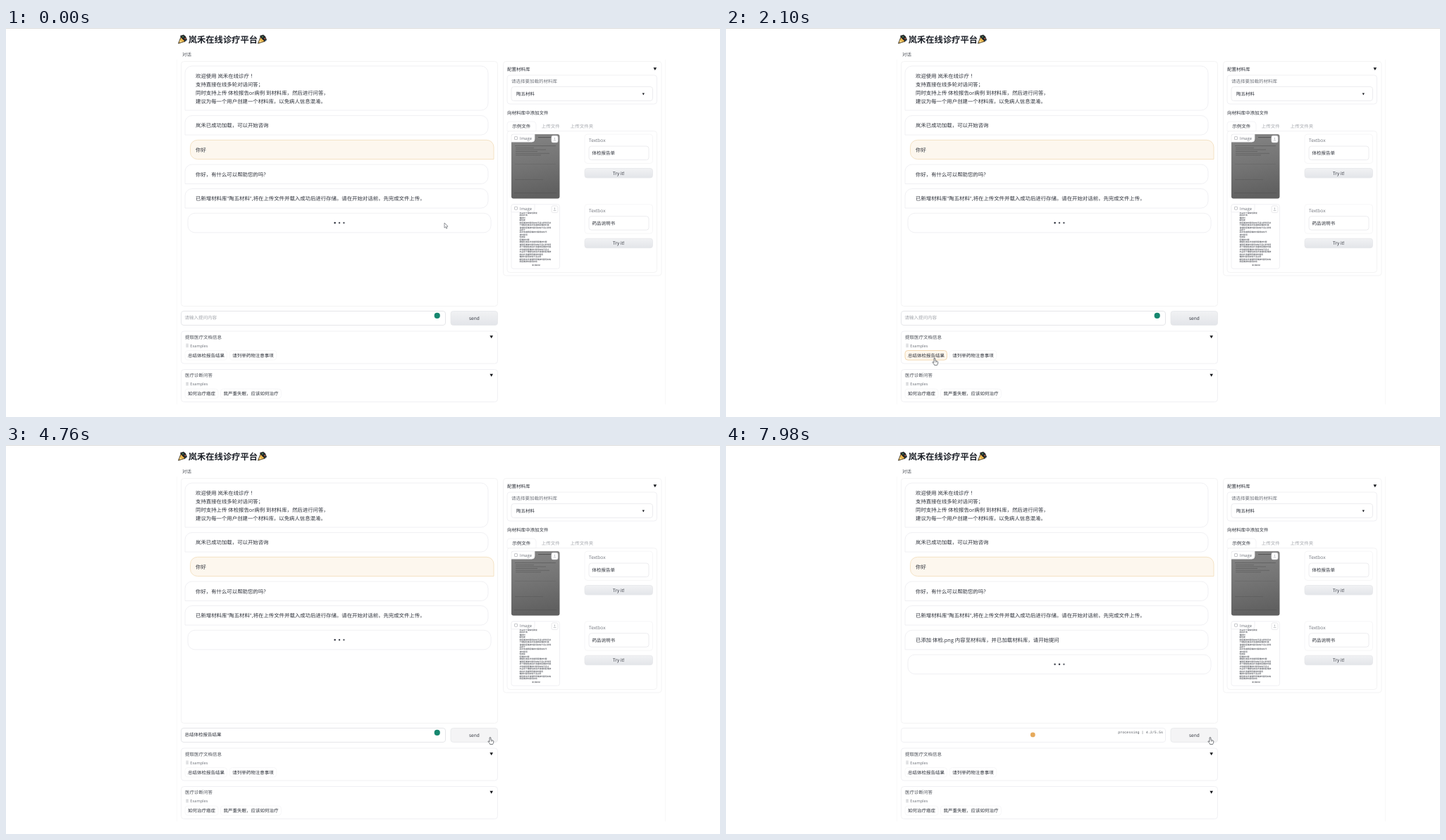
These frames come from a looping animation (1013x553 px, 8 s). An HTML page with a canvas:

```html
<!DOCTYPE html>
<html lang="zh">
<head>
<meta charset="utf-8">
<style>
html, body { margin: 0; width: 100%; height: 100%; overflow: hidden; background: #fff; }
canvas { display: block; }
</style>
</head>
<body>
<canvas id="stage" width="1013" height="553"></canvas>
<script>
const ctx = document.getElementById('stage').getContext('2d');
ctx.textRendering = 'geometricPrecision';

const LOOP = 8000, SENT = 5740;
const SANS = '"Open Sans", "Noto Sans CJK SC", "Noto Sans CJK", sans-serif';
const MONO = '"Liberation Mono", monospace';
const INK = '#2b2f38', GRAY = '#6f737b', PALE = '#a3a6ac', LINE = '#ededf0';
const CHIP = [254, 458.5, 59.5, 13.5], SEND = [631, 402.5, 66.5, 20];

// Text centred vertically on y
function text(str, x, y, { size = 6.5, color = INK, align = 'left', weight = 400, family = SANS } = {}) {
  ctx.font = `${weight} ${size}px ${family}`;
  ctx.fillStyle = color;
  ctx.textAlign = align;
  ctx.fillText(str, x, y + size * 0.37);
}

function box(x, y, w, h, radius = 4, stroke = LINE, fill) {
  ctx.beginPath();
  ctx.roundRect(x, y, w, h, radius);
  if (fill) { ctx.fillStyle = fill; ctx.fill(); }
  if (stroke) { ctx.strokeStyle = stroke; ctx.lineWidth = 0.8; ctx.stroke(); }
}

function shape(points, fill, stroke, width = 0.8) {
  ctx.beginPath();
  points.forEach(([x, y]) => ctx.lineTo(x, y));
  ctx.closePath();
  if (fill) { ctx.fillStyle = fill; ctx.fill(); }
  if (stroke) { ctx.strokeStyle = stroke; ctx.lineWidth = width; ctx.stroke(); }
}

function circle(x, y, r, fill) {
  ctx.beginPath();
  ctx.arc(x, y, r, 0, Math.PI * 2);
  ctx.fillStyle = fill;
  ctx.fill();
}

function rect(x, y, w, h, fill) {
  ctx.fillStyle = fill;
  ctx.fillRect(x, y, w, h);
}

function gradient(x0, y0, x1, y1, ...colors) {
  const g = ctx.createLinearGradient(x0, y0, x1, y1);
  colors.forEach((c, i) => g.addColorStop(i / (colors.length - 1), c));
  return g;
}

const arrowDown = (x, y, s = 2.3) => shape([[x - s, y - s * 0.8], [x + s, y - s * 0.8], [x, y + s]], '#15171c');
const inside = ([px, py], [x, y, w, h]) => px >= x && px <= x + w && py >= y && py <= y + h;

function button(label, x, y, w, h, hovered) {
  box(x, y, w, h, 3.5, '#e6e7ea', hovered ? '#f4f4f5' : gradient(0, y, 0, y + h, '#f1f2f4', '#e3e5e9'));
  text(label, x + w / 2, y + h / 2, { align: 'center' });
}

function popper(x) {
  ctx.save();
  ctx.translate(x, 9);
  shape([[3, 2], [8, 0.5], [11, 3], [13, 8], [9, 11], [5, 7]], '#25282a');
  shape([[0.5, 13], [4, 4], [10, 10]], '#e9b44c', '#25231c');
  shape([[2, 11], [3.2, 8], [6, 11.2]], '#f7d98a');
  circle(7, 3.5, 0.9, '#4d9a63');
  circle(10.3, 6, 0.9, '#cf6a4f');
  circle(11.6, 9, 0.7, '#4f86b8');
  ctx.restore();
}

function bubble(y, h, lines) {
  box(254, y, 430, h, [10, 10, 10, 0]);
  lines.forEach((s, i) => text(s, 269, y + 13.8 + i * 12, { size: 7.4 }));
}

function pending(y, t) {
  box(258, y, 430, 27.5, 10);
  for (let i = 0; i < 3; i++) {
    const phase = (((t / 525 - i * 0.33) % 1) + 1) % 1;
    ctx.globalAlpha = 0.62 + 0.36 * Math.abs(phase * 2 - 1);
    circle(466.6 + i * 6.4, y + 13.8, 1.25, '#1f2430');
  }
  ctx.globalAlpha = 1;
}

function chat(t) {
  const added = t >= 4870;
  box(248.5, 47.5, 449, 348, 4, '#f0f0f2');
  bubble(54, 63, ['欢迎使用 岚禾在线诊疗 ！', '支持直接在线多轮对话问答；',
    '同时支持上传 体检报告or病例 到材料库，然后进行问答，', '建议为每一个用户创建一个材料库，以免病人信息混淆。']);
  bubble(124.5, 27.5, ['岚禾已成功加载，可以开始咨询']);
  box(261.5, 159.3, 430.5, 27.2, [10, 10, 0, 10], '#f2dcb8', '#fdf7ee');
  text('你好', 269, 173, { size: 7.4 });
  bubble(194, 27.5, ['你好，有什么可以帮助您的吗？']);
  bubble(228.5, 27.5, ['已新增材料库"陶五材料",将在上传文件并载入成功后进行存储。请在开始对话前，先完成文件上传。']);
  if (added) bubble(263.3, 27.5, ['已添加 体检.png 内容至材料库，并已加载材料库，请开始提问']);
  else pending(263.3, t);
  if (t >= SENT) pending(298, t);
}

function promptRow(t, hoverPoint) {
  box(248.5, 402.5, 375, 20, 3.5, t < SENT ? '#dfe0e4' : LINE);
  if (t < SENT) {
    const filled = t >= 2200;
    text(filled ? '总结体检报告结果' : '请输入提问内容', 253.5, 412, { color: filled ? INK : PALE });
    circle(611.7, 408.9, 4.1, '#16876f');
  } else {
    const status = t < 7000 ? 'queue: 1/1' : 'processing';
    const seconds = Math.max(0, (t - 5775) * 0.001905).toFixed(1);
    circle(435.3, 411.9, 3.4, '#e6aa5c');
    text(`${status} | ${seconds}/5.5s`, 620, 408.5, { size: 5.07, align: 'right', color: '#555960', family: MONO });
  }
  button('send', ...SEND, inside(hoverPoint, SEND));
}

function examples(y, title, chips) {
  box(248.5, y, 449, 46, 4);
  text(title, 254, y + 8.3, { color: '#4c5058' });
  arrowDown(688.7, y + 8);
  for (let i = 0; i < 3; i++) rect(255.3, y + 18.4 + i * 1.7, 3.6, 0.6, PALE);
  text('Examples', 261.3, y + 20.5, { size: 5.6, color: GRAY });
  chips.forEach(([label, x, w, hovered]) => {
    box(x, y + 27.5, w, 13.5, 4, hovered ? '#efcf9f' : '#f5f5f6', hovered ? '#fff8ee' : null);
    text(label, x + 4, y + 34.3);
  });
}

function photo(x, y) {
  box(x, y, 68.5, 91.5, 3, null, gradient(x, y, x + 20, y + 91, '#858585', '#757575', '#606060'));
  rect(x + 38, y + 4, 22, 1, '#555');
  rect(x + 5, y + 16, 58, 0.7, '#5a5a5a');
  for (let i = 0; i < 5; i++) rect(x + 6, y + 19 + i * 2.6, 26 + (i * 17) % 29, 0.8, '#5f5f5f');
  rect(x + 5, y + 42, 58, 0.6, '#666');
  rect(x + 5, y + 64, 40, 0.6, '#5a5a5a');
  rect(x + 4, y + 83, 60, 0.7, '#555');
}

function leaflet(x, y) {
  const words = '本品用于缓解轻度症状请遵照医嘱按时服用如有不适立即停药并咨询医师';
  const lengths = [9, 4, 3, 3, 16, 15, 16, 3, 14, 4, 3, 5, 14, 16, 16, 15, 16, 12, 11, 16, 9];
  box(x, y, 68.5, 91.5, 3, LINE, '#fff');
  lengths.forEach((n, i) => {
    const start = (i * 7) % 16;
    text(words.slice(start, start + n), x + 11.5, y + 12 + i * 3.47, { size: 2.8, weight: 500 });
  });
  text('请仔细阅读', x + 35, y + 86, { size: 2.4, align: 'center' });
}

function sample(y, label, picture) {
  picture(717, y);
  box(717, y, 33, 11, [3, 0, 4, 0], LINE, '#fff');
  box(721.5, y + 3.5, 4, 4, 0.5, '#b5b7bc');
  text('Image', 729, y + 5.7, { size: 5.9, color: GRAY });
  box(774, y + 2.2, 9, 9.5, 2, '#e5e5e8', '#fff');
  rect(778.2, y + 4.6, 0.7, 3, PALE);
  rect(776.7, y + 8.6, 3.7, 0.6, PALE);
  box(821, y, 96.5, 41.5, 4, '#f4f4f5');
  text('Textbox', 827, y + 9, { color: GRAY });
  box(827, y + 17, 85, 19.5, 3.5, '#e8e8eb');
  text(label, 831.5, y + 26.7);
  button('Try it!', 821, y + 48.5, 96.5, 13.5);
}

function library() {
  box(705.5, 47.5, 224.5, 304.5, 4, '#f0f0f2');
  text('配置材料库', 711, 58.3);
  arrowDown(920.8, 58);
  box(711, 67, 212.5, 41, 4);
  text('请选择要加载的材料库', 717, 76, { color: GRAY });
  box(717, 83.5, 200.5, 20, 3.5, '#e8e8eb');
  text('陶五材料', 724, 93.6);
  arrowDown(904.3, 93.9, 1.6);
  text('向材料库中添加文件', 711, 120.4);
  text('示例文件', 718.3, 139.6);
  text('上传文件', 759.7, 139.6, { color: PALE });
  text('上传文件夹', 800.7, 139.6, { color: PALE });
  box(711, 133, 41, 13.5, [4, 4, 0, 0], '#f2f2f4');
  box(711, 146.5, 212.5, 201, 4, '#f0f0f2');
  sample(151, '体检报告单', photo);
  sample(250.7, '药品说明书', leaflet);
}

// Pointer route: time, x, y
const ROUTE = [
  [70, 622, 277], [630, 308, 413], [850, 288, 466], [1150, 295, 468], [1330, 348, 469],
  [1580, 296, 469.3], [2570, 296, 469.3], [3220, 564, 325], [3380, 650, 345], [4200, 687, 415.5],
];

function pointerAt(t) {
  const next = ROUTE.findIndex(key => key[0] > t);
  if (next === 0) return ROUTE[0].slice(1);
  if (next < 0) return ROUTE[ROUTE.length - 1].slice(1);
  const [t0, x0, y0] = ROUTE[next - 1], [t1, x1, y1] = ROUTE[next];
  const u = (t - t0) / (t1 - t0), k = u * u * (3 - 2 * u);
  return [x0 + (x1 - x0) * k, y0 + (y1 - y0) * k];
}

function pointer([x, y]) {
  ctx.save();
  ctx.translate(x, y);
  ctx.lineJoin = 'round';
  if (inside([x, y], CHIP) || inside([x, y], SEND)) {
    shape([[-0.9, 0.4], [0, 0], [0.9, 0.5], [1, 3.8], [4, 4.6], [4.8, 5.6], [4.5, 8], [3.6, 10],
      [-0.3, 10], [-1.2, 8.2], [-3, 6.2], [-2.6, 5.3], [-0.9, 6.3]], '#fff', '#55585e');
    for (const i of [1, 2.4]) rect(i, 4.6, 0.5, 1.8, '#777');
  } else {
    shape([[0, 0], [0, 7.2], [1.6, 5.7], [2.8, 8.2], [3.9, 7.6], [2.8, 5.3], [5, 5.1]], '#fff', '#777a80');
  }
  ctx.restore();
}

function draw(t) {
  const hoverPoint = pointerAt(t - 140);
  rect(0, 0, 1013, 553, '#fff');
  rect(0, 0, 1013, 1, '#dcdcdc');
  rect(242, 45, 0.6, 490, '#f3f3f4');
  rect(935, 45, 0.6, 490, '#f3f3f4');
  popper(244);
  text('岚禾在线诊疗平台', 258.7, 16, { size: 12.3, weight: 700, color: '#1d2129' });
  popper(357);
  text('对话', 250, 37.7, { color: '#4c5058' });
  chat(t);
  promptRow(t, hoverPoint);
  examples(431, '提取医疗文档信息', [
    ['总结体检报告结果', 254, 59.5, inside(hoverPoint, CHIP)],
    ['请列举药物注意事项', 317.3, 66.5, inside(hoverPoint, [317.3, 458.5, 66.5, 13.5])],
  ]);
  examples(485.5, '医疗诊断问答', [['如何治疗癌症', 254, 47], ['我严重失眠，应该如何治疗', 304.5, 86]]);
  library();
  pointer(pointerAt(t));
}

const begin = performance.now();
function frame() {
  draw((performance.now() - begin) % LOOP);
  requestAnimationFrame(frame);
}
frame();
</script>
</body>
</html>
```
